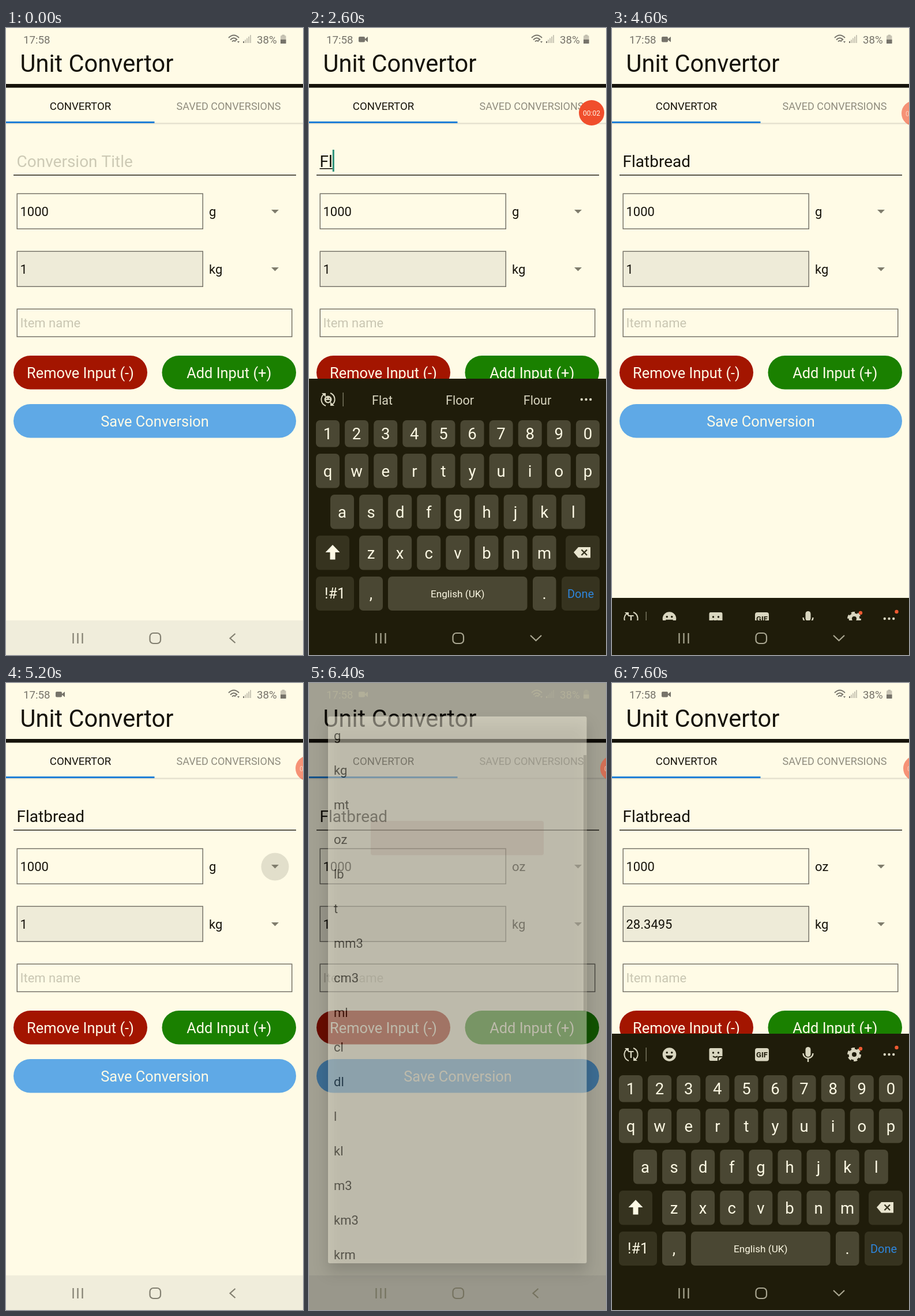
An HTML page with a canvas for the animation above (8 s loop, 515x1087 px).

```html
<!DOCTYPE html>
<html lang="en">
<head>
<meta charset="utf-8">
<title>Unit Convertor</title>
<style>
html, body { margin: 0; width: 100%; height: 100%; overflow: hidden; background: #fffbe6; }
canvas { display: block; }
</style>
</head>
<body>
<canvas id="stage" width="515" height="1087"></canvas>
<script>
const LOOP = 8000, STEP = 200, W = 515, H = 1087;
const CREAM = '#fffbe6', INK = '#15120a', PANEL = '#1f1c0a', ICON = '#d9d6c0';
const main = document.getElementById('stage').getContext('2d');
let ctx = main;

// Each track holds [start time, value] pairs.
const KEYBOARD = [[0, 480], [1400, 330], [1600, 80], [1800, 10], [2000, 0], [4400, 120], [4600, 380],
  [4800, 480], [7000, 330], [7200, 80], [7400, 10], [7600, 0]];
const TYPED = [[0, 0], [2400, 1], [2600, 2], [2800, 3], [3000, 5], [3200, 6], [3400, 7], [3600, 8], [3800, 9]];
const DIM = [[0, 0], [5400, .25], [5600, .55], [6400, .365], [6600, 0]];
const DIALOG = [[0, 0], [5400, .4], [5600, 1], [6400, .44], [6600, 0]];
const BUBBLE = [ // x, y, radius, opacity
  [0, [490, 147, 0, 0]], [200, [490, 147, 10, .4]], [400, [490, 147, 18, .8]], [600, [490, 147, 22, 1]],
  [3400, [494, 148, 20, .9]], [3600, [504, 149, 18, .82]], [3800, [516, 148, 20, .7]],
  [4000, [524, 148, 22, .6]], [5400, [527, 148, 22, .6]]];
const UNITS = 'g kg mt oz lb t mm3 cm3 ml cl dl l kl m3 km3 krm'.split(' ');
const at = (track, t) => track.findLast(([start]) => start <= t)[1];

function text(str, x, y, size, color = INK, align = 'left', weight = 400) {
  ctx.font = `${weight} ${size}px Roboto, sans-serif`;
  ctx.textAlign = align;
  ctx.fillStyle = color;
  ctx.fillText(str, x, y);
}
function rect(x, y, w, h, color) {
  ctx.fillStyle = color;
  ctx.fillRect(x, y, w, h);
}
function pill(x, y, w, h, r, color) {
  ctx.beginPath();
  ctx.roundRect(x, y, w, h, r);
  ctx.fillStyle = color;
  ctx.fill();
}
function disc(x, y, r, color) {
  ctx.beginPath();
  ctx.arc(x, y, r, 0, 7);
  ctx.fillStyle = color;
  ctx.fill();
}
function fill(path, color) {
  ctx.fillStyle = color;
  ctx.fill(new Path2D(path));
}
function stroke(path, color, width = 2) {
  ctx.strokeStyle = color;
  ctx.lineWidth = width;
  ctx.stroke(new Path2D(path));
}
function moved(x, y, draw) {
  ctx.save();
  ctx.translate(x, y);
  draw();
  ctx.restore();
}

function statusBar(color, recording) {
  text('17:58', 30, 26.5, 18.7, color);
  text('38%', 435, 26.5, 18.7, color);
  if (recording) {
    pill(86, 15, 11, 9.5, 2, color);
    fill('M97 19L102 15V24.5L97 20.5Z', color);
  }
  stroke('M386 17Q395 8 404 17M389 20.5Q395 14 401 20.5M392 23.5Q395 20.5 398 23.5', color, 1.9);
  fill('M397 22H400L398.5 19ZM401 23H405L403 26Z', color);
  ctx.globalAlpha = .4;
  for (let i = 0; i < 5; i++) {
    if (i) rect(411 + i * 3, 23 - i * 2.7, 2, 3 + i * 2.7, color);
  }
  pill(476, 13, 9.5, 14, 1.5, color);
  rect(478.5, 11.5, 4.5, 2, color);
  ctx.globalAlpha = 1;
  rect(411, 23, 2, 3, color);
  rect(476, 20, 9.5, 7, color);
}

function navIcons(color, down) {
  for (const x of [116.5, 124.5, 132.5]) rect(x - 1.1, 1049, 2.2, 18, color);
  ctx.beginPath();
  ctx.roundRect(249.5, 1049, 18.5, 18, 6);
  ctx.strokeStyle = color;
  ctx.lineWidth = 2.2;
  ctx.stroke();
  stroke(down ? 'M384 1053L393.5 1062L403 1053' : 'M397.5 1050L388.5 1058L397.5 1066', color, 2.2);
}

function field(y, w, h, value, color, bg) {
  if (bg) rect(19, y, w, h, bg);
  ctx.strokeStyle = '#77746a';
  ctx.lineWidth = 1.5;
  ctx.strokeRect(19.25, y + .25, w, h);
  text(value, 24.5, y + h / 2 + 8.3, 22, color);
}
function unitPicker(y, unit) {
  text(unit, 352, y + 8, 22);
  fill(`M460 ${y - 3}H473L466.5 ${y + 3.5}Z`, '#7f7c6c');
}
function button(x, y, w, label, color) {
  pill(x, y, w, 58.5, 29.25, color);
  text(label, x + w / 2, y + 39, 25.4, CREAM, 'center');
}

function app(t) {
  rect(0, 0, W, H, CREAM);
  text('Unit Convertor', 24.5, 76, 41.6);
  rect(0, 97, W, 6.5, INK);
  text('CONVERTOR', 129, 141.5, 18.6, INK, 'center');
  text('SAVED CONVERSIONS', 386, 141.5, 18, '#8f8c7e', 'center');
  rect(0, 164.5, W, 1.5, '#dedac9');
  rect(0, 166, W, 2, '#f7f3df');
  rect(0, 162, 257.5, 3, '#2080d8');

  const title = 'Flatbread'.slice(0, at(TYPED, t));
  text(title || 'Conversion Title', 18.5, 241, 28, title ? INK : '#cdcab5');
  if (t >= 1200 && t < 4400) {
    const width = title ? ctx.measureText(title).width : 0;
    if (title) rect(18.5, 243, width, 1.6, INK);
    rect(18.5 + width, 211, 3, 38, '#2a8f78');
  }
  rect(13, 254.3, 490, 1.5, '#24211a');

  if (t === 5200 || t === 5400) disc(466.5, 318.5, 24, '#e2dfcb');
  field(287, 322, 61, '1000', INK);
  unitPicker(318, t < 6400 ? 'g' : 'oz');
  field(387, 322, 61, t < 6600 ? '1' : '28.3495', INK, '#eeebd8');
  unitPicker(418, 'kg');
  field(487, 476.5, 48, 'Item name', '#c9c6b2');
  button(13, 568, 232, 'Remove Input (-)', '#a31500');
  button(270.5, 568, 232.5, 'Add Input (+)', '#1a8000');
  button(13, 652, 490, 'Save Conversion', '#5fa9e6');
}

function smiley(r) {
  disc(0, 0, r, ICON);
  disc(-r * .36, -r * .28, r * .15, PANEL);
  disc(r * .36, -r * .28, r * .15, PANEL);
  const m = r * .55;
  fill(`M${-m} ${r * .15}H${m}Q${r * .4} ${r * .65} 0 ${r * .65}Q${-r * .4} ${r * .65} ${-m} ${r * .15}Z`, PANEL);
}

function toolbar(typed) {
  moved(33, 644, () => {
    stroke('M-4 11A11.5 11.5 0 0 1 -7 -9M4 -11A11.5 11.5 0 0 1 7 9', ICON, 2);
    fill('M-11 -11H-4V-4ZM11 11H4V4Z', ICON);
    if (typed) smiley(6.5);
    else text('T', 0, 5.7, 16, ICON, 'center', 700);
  });
  rect(58.5, 632, 1.5, 24, '#77745f');
  for (const x of [472.8, 480.5, 488.2]) disc(x, 644, 2.2, ICON);
  if (typed) {
    const words = typed < 3 ? ['Flat', 'Floor', 'Flour']
      : typed < 6 ? ['Flat', 'Flatter', 'Flats']
      : typed < 9 ? ['Flatbread', 'Flatbed', 'Flatter']
      : ['Flatbread', 'Flatbreads', 'Flatbed'];
    words.forEach((word, i) => text(word, 127 + i * 134.5, 653, 21.5, ICON, 'center'));
    return;
  }
  moved(99.5, 644, () => smiley(11.8));
  moved(180, 644, () => {
    fill('M-9 -11H9Q11.5 -11 11.5 -8V3H6Q3 3 3 6V11H-9Q-11.5 11 -11.5 8V-8Q-11.5 -11 -9 -11ZM5 11V7Q5 5 7 5H11.5Z', ICON);
    disc(-4.5, -3, 1.7, PANEL);
    disc(4.5, -3, 1.7, PANEL);
    stroke('M-5 3Q-1 6.5 3 3', PANEL);
  });
  pill(248, 633, 24, 22.5, 4, ICON);
  text('GIF', 260, 649, 13, PANEL, 'center', 700);
  moved(340, 644, () => {
    pill(-4.5, -13, 9, 17, 4.5, ICON);
    stroke('M-8.5 -2A8.5 8.5 0 0 0 8.5 -2M0 6V13', ICON, 2.4);
  });
  moved(420, 644, () => {
    ctx.beginPath();
    ctx.arc(0, 0, 10, 0, 2 * Math.PI);
    ctx.strokeStyle = ICON;
    ctx.lineWidth = 4;
    ctx.setLineDash([Math.PI * 1.9, Math.PI * 20 / 6 - Math.PI * 1.9]);
    ctx.stroke();
    disc(0, 0, 9.5, ICON);
    disc(0, 0, 4, PANEL);
  });
  disc(431, 634, 3.2, '#ee5a32');
  disc(493.5, 632, 3.2, '#ee5a32');
}

function key(x, y, w, h, label = '', size = 27.5, bg = '#4a4733', color = '#fdf9e4') {
  pill(x, y, w, h, 7, bg);
  text(label, x + w / 2, y + h / 2 + size * .355, size, color, 'center');
}
function keyRow(letters, x, y, h) {
  [...letters].forEach((letter, i) => key(x + i * 50.1, y, 41, h, letter));
}

function keyboard(offset, t) {
  const typed = t < 4400 ? at(TYPED, t) : 0;
  const upper = t < 2400;
  const letters = s => upper ? s.toUpperCase() : s;
  const special = '#36331f';
  moved(0, offset, () => {
    rect(0, 608, W, 480, PANEL);
    toolbar(typed);
    keyRow('1234567890', 12, 680, 46.5);
    keyRow(letters('qwertyuiop'), 12, 738, 59.5);
    keyRow(letters('asdfghjkl'), 37, 809, 59.5);
    keyRow(letters('zxcvbnm'), 87, 880, 59.5);
    key(12, 880, 58, 59.5, '', 20, special);
    fill('M41 896L53.5 909H45.5V921.5H36.5V909H28.5Z', upper ? '#4e9fe6' : '#fdf9e4');
    key(445, 880, 59, 59.5, '', 20, special);
    fill('M459 909L467 900H488V918.5H467Z', '#eae6d0');
    stroke('M472.5 904.5L482 914M482 904.5L472.5 914', special, 2.4);
    key(12, 951, 66, 59, '!#1', 25, special);
    key(87, 951, 41, 59, ',');
    key(137, 951, 241.5, 59, 'English (UK)', 17.2);
    key(388, 951, 40.5, 59, '.');
    key(438, 951, 66, 59, 'Done', 20, special, '#2e86dc');
  });
}

function makeDialog() {
  const canvas = document.createElement('canvas');
  canvas.width = W;
  canvas.height = H;
  ctx = canvas.getContext('2d');
  pill(33, 58, 448.5, 948, 3, CREAM);
  UNITS.forEach((unit, i) => text(unit, 43, 98.5 + i * 60, 22));
  rect(476, 125, 5.5, 444, '#b9b5a1');
  ctx = main;
  return canvas;
}
const dialog = makeDialog();

function bubble(t) {
  const [x, y, r, alpha] = at(BUBBLE, t);
  const seconds = Math.max(0, Math.floor((t - 200) / 1000));
  ctx.globalAlpha = alpha;
  disc(x, y, r, '#f04e2c');
  if (r > 15) text('00:0' + seconds, x, y + 4.5, 12, '#fff6e6', 'center');
  ctx.globalAlpha = 1;
}

function overlay(t) {
  rect(0, 0, W, H, `rgba(0,0,0,${at(DIM, t)})`);
  ctx.save();
  ctx.globalAlpha = at(DIALOG, t);
  ctx.shadowColor = 'rgba(0,0,0,.35)';
  ctx.shadowBlur = 26;
  ctx.shadowOffsetY = 14;
  ctx.drawImage(dialog, 0, 0);
  ctx.restore();
  if (t === 6400) pill(107, 239, 300, 59.5, 4, 'rgba(110,60,50,.09)');
}

function render(t) {
  const offset = at(KEYBOARD, t), typing = offset < 480;
  const modal = at(DIALOG, t);
  app(t);
  if (typing) {
    if (t < 4400 || t >= 7000) rect(0, 608, W, 420, CREAM);
    keyboard(offset, t);
  }
  rect(0, 1027, W, 60, typing ? PANEL : '#f0eddb');
  if (modal) overlay(t);
  const fading = modal && modal < 1;
  statusBar(modal ? (fading ? '#b2af99' : '#eeead5') : '#76736a', t >= 200);
  navIcons(fading ? '#75725f' : modal ? '#c4c1aa' : typing ? '#aaa792' : '#827f70', typing);
  bubble(t);
}

function tick(now) {
  render(Math.floor(now % LOOP / STEP) * STEP);
  requestAnimationFrame(tick);
}
requestAnimationFrame(tick);
</script>
</body>
</html>
```
